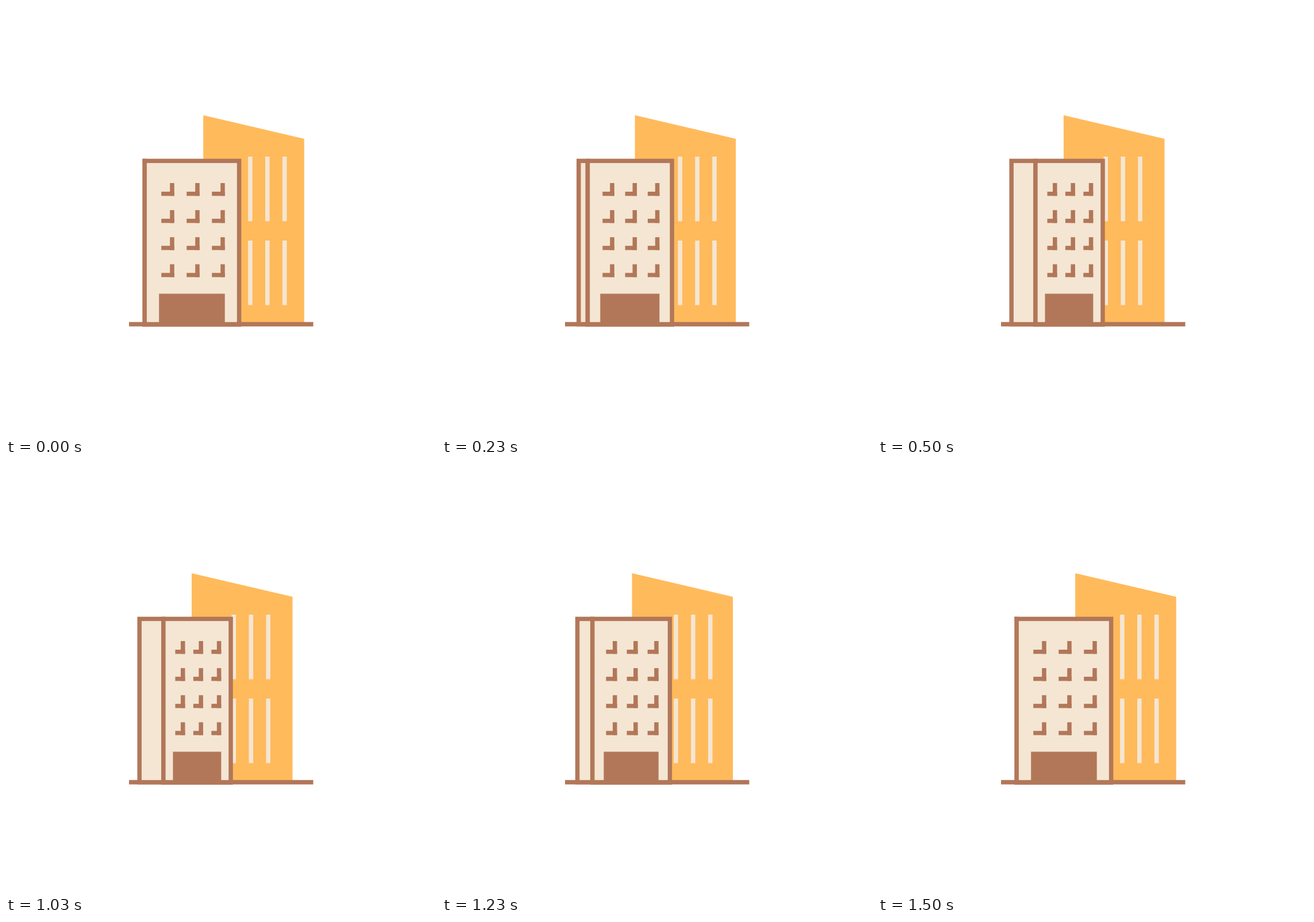
An HTML page with a canvas that plays this animation: 748x748 px, repeating every 2000 ms.

```html
<!DOCTYPE html>
<html lang="en">
<head>
<meta charset="utf-8">
<title>Turning buildings</title>
<style>
  html, body { margin: 0; width: 100%; height: 100%; overflow: hidden; background: #fff; }
  canvas { display: block; width: 748px; height: 748px; }
</style>
</head>
<body>
<canvas id="stage" width="748" height="748"></canvas>
<script>
const ctx = document.getElementById('stage').getContext('2d');
const YELLOW = '#ffba5c', CREAM = '#f4e6d3', BROWN = '#b27759';
const LINE = 7.5, FPS = 30, LOOP_FRAMES = 60, MOVE_FRAMES = 15;

// Same curve as cubic-bezier(.75, 0, .25, 1)
function ease(x) {
  let lo = 0, hi = 1;
  for (let i = 0; i < 30; i++) {
    const t = (lo + hi) / 2;
    if (2.25 * t - 3.75 * t * t + 2.5 * t ** 3 < x) lo = t; else hi = t;
  }
  return lo * lo * (3 - 2 * lo);
}

function box(color, left, top, right, bottom) {
  ctx.fillStyle = color;
  ctx.fillRect(left, top, right - left, bottom - top);
}

function wall(left, right, bottom) {
  box(BROWN, left, 265.7, right, bottom);
  box(CREAM, left + LINE, 273.2, right - LINE, 549.8);
}

function drawTower(mix) {
  const left = mix(343.2, 322.9), right = left + 175.5;
  ctx.fillStyle = YELLOW;
  ctx.beginPath();
  ctx.moveTo(left, 190);
  ctx.lineTo(right, 231);
  ctx.lineTo(right, 552);
  ctx.lineTo(left, 552);
  ctx.fill();
  for (let i = 0; i < 3; i++) {
    const x = mix(421.1, 392.5) + i * 29.9;
    box(CREAM, x, 262, x + LINE, 374.4);
    box(CREAM, x, 408, x + LINE, 520.4);
  }
}

function drawFront(mix) {
  const edge = mix(237.4, 270.2);
  wall(mix(237.4, 228.4), edge + LINE, 557.4);
  wall(edge, mix(409.3, 394.7), 557.8);
  box(BROWN, mix(266.2, 290.5), 500.5, mix(380.7, 374.3), 552);
  for (let col = 0; col < 3; col++) {
    const left = mix(270.2, 294.5) + col * mix(44, 31.4);
    const right = left + mix(22.5, 17);
    for (let row = 0; row < 4; row++) {
      const top = 308 + row * 47.1;
      box(BROWN, right - LINE, top, right, top + 22.3);
      box(BROWN, left, top + 15, right, top + 22.3);
    }
  }
}

function draw(turn) {
  const mix = (a, b) => a + (b - a) * turn;
  ctx.clearRect(0, 0, 748, 748);
  drawTower(mix);
  box(BROWN, 214, 549.7, 534.5, 557.4);
  drawFront(mix);
}

const start = performance.now();
function tick() {
  const elapsed = Math.max(0, performance.now() - start);
  // Frame times are rounded to the nearest 10 ms
  const frame = Math.floor((elapsed + 5) * FPS / 1000) % LOOP_FRAMES;
  const half = LOOP_FRAMES / 2;
  const eased = ease(Math.min(1, (frame % half) / MOVE_FRAMES));
  draw(frame < half ? eased : 1 - eased);
  requestAnimationFrame(tick);
}
tick();
</script>
</body>
</html>
```
